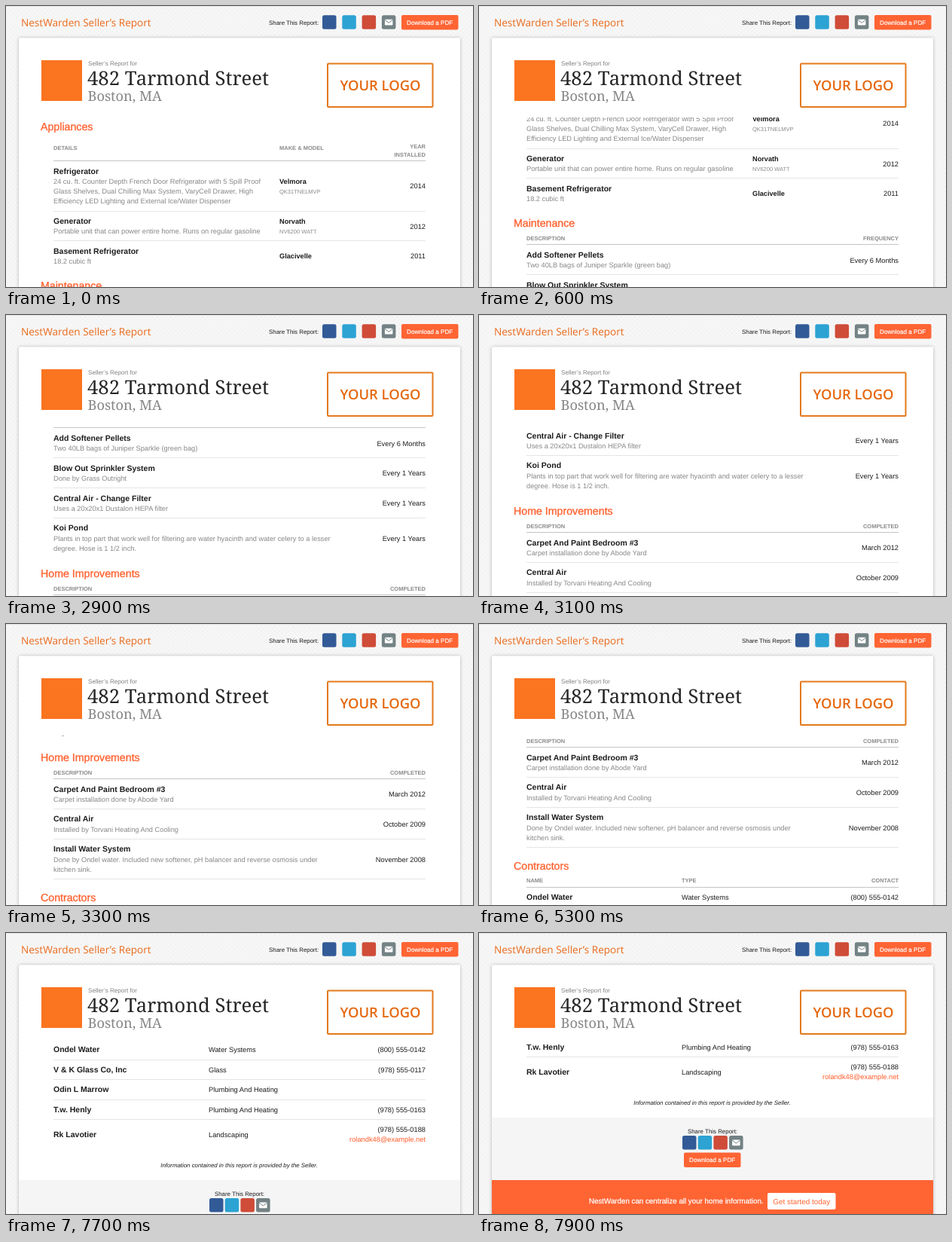
An HTML page that plays this animation: 620 px wide and 373 px high, repeating every 8000 ms.

```html
<!DOCTYPE html>
<html lang="en">
<head>
<meta charset="utf-8">
<title>Seller's Report</title>
<style>
  html, body { margin: 0; width: 100%; height: 100%; overflow: hidden; }
  svg { display: block; width: 100%; height: 100%; }
  text { font-family: "Liberation Sans", Arial, sans-serif; fill: #1c1c1c; text-rendering: geometricPrecision; }
  .brand { font: 13.6px "Open Sans", sans-serif; fill: #ea6a1c; }
  .address { font: 25.7px "Noto Serif", serif; fill: #262626; }
  .city { font: 18.2px "Noto Serif", serif; fill: #858585; }
  .logo { font: 600 18.4px "Open Sans", sans-serif; fill: #e5680f; }
  .eyebrow { font-size: 8.1px; fill: #808080; }
  .share { font-size: 7.9px; }
  .button { font-size: 8.1px; fill: #fff; stroke: #fff; stroke-width: .2; }
  .section { font-size: 14.2px; fill: #ff6230; stroke: #ff6230; stroke-width: .35; }
  .head { font-size: 7.5px; font-weight: bold; fill: #8a8a8a; }
  .name { font-size: 10.5px; font-weight: bold; }
  .detail { font-size: 9.25px; fill: #878787; }
  .value { font-size: 9.3px; }
  .make { font-size: 9.2px; font-weight: bold; }
  .model { font-size: 7.5px; fill: #8a8a8a; }
  .mail { font-size: 9.3px; fill: #ff5a28; }
  .note { font-size: 7.85px; font-style: italic; }
  .pitch { font-size: 9.75px; fill: #fff; stroke: #fff; stroke-width: .25; }
  .start { font-size: 9.9px; fill: #ff6230; }
</style>
</head>
<body>
<svg viewBox="0 0 620 373">
  <defs>
    <pattern id="weave" width="6" height="6" patternUnits="userSpaceOnUse">
      <rect width="6" height="6" fill="#f7f7f7"/>
      <path d="M0 0L6 6M6 0L0 6" stroke="#f2f2f2"/>
    </pattern>
    <filter id="shadow" x="-5%" y="-5%" width="110%" height="110%">
      <feDropShadow dx="0" dy="0" stdDeviation="2" flood-opacity=".28"/>
    </filter>
    <clipPath id="window"><rect y="148" width="620" height="225"/></clipPath>
  </defs>
  <rect width="620" height="373" fill="url(#weave)"/>
  <rect width="620" height="1" fill="#e4e4e4"/>
  <rect x="17" y="42.5" width="586" height="400" rx="2" fill="#fff" filter="url(#shadow)"/>
  <g id="header"></g>
  <g clip-path="url(#window)"><g id="report"></g></g>
</svg>
<script>
const BRAND = "NestWarden", ORANGE = "#ff6433";
const LEFT = 63, MIDDLE = 269, MAKE = 363, RIGHT = 557, LINE = 13.3;
const header = document.getElementById("header");
const report = document.getElementById("report");
let layer = header;

function add(tag, attributes, content = "") {
  const node = document.createElementNS("http://www.w3.org/2000/svg", tag);
  for (const key in attributes) node.setAttribute(key, attributes[key]);
  node.textContent = content;
  layer.append(node);
}
const label = (style, x, y, content, anchor = "start") =>
  add("text", { class: style, x, y, "text-anchor": anchor }, content);
const box = (x, y, width, height, fill, rx = 0) => add("rect", { x, y, width, height, fill, rx });
const rule = (y, fill = "#e5e5e5") => box(LEFT, y - .5, RIGHT - LEFT, 1, fill);

function shareIcons(x, y, pitch) {
  ["#325a96", "#2ca3d3", "#cf4c38", "#738284"].forEach((color, i) =>
    box(x + i * pitch, y, 18.5, 18.5, color, 2.5));
  const left = x + 3 * pitch + 4, top = y + 5.5;
  box(left, top, 10.5, 7.8, "#fff", .8);
  add("path", { d: `M${left} ${top + .6}l5.25 4l5.25 -4`, fill: "none", stroke: "#738284" });
}

function downloadButton(x, y) {
  box(x, y, 75.5, 19.5, ORANGE, 2);
  label("button", x + 37.7, y + 12.6, "Download a PDF", "middle");
}

function section(title, titleY, headY, ruleY, columns) {
  label("section", 46, titleY, title);
  for (const [x, content] of columns)
    label("head", x, headY, content, x === RIGHT ? "end" : "start");
  rule(ruleY, "#c4c4c4");
}

// Each row is [name, detail lines, right value, extra(middle baseline)].
function rows(y, list, lastRule = false) {
  list.forEach(([name, details, value, extra], i) => {
    const height = LINE * details.length, middle = y + height / 2;
    label("name", LEFT, y, name);
    details.forEach((line, n) => label("detail", LEFT, y + LINE * (n + 1), line));
    label("value", RIGHT, middle, value, "end");
    if (extra) extra(middle);
    if (lastRule || i < list.length - 1) rule(Math.round(y + height + 9.2) + .5);
    y += height + 26.5;
  });
}

const product = (maker, model) => y => {
  label("make", MAKE, model ? y - 6.6 : y, maker);
  if (model) label("model", MAKE, y + 6.2, model);
};
const trade = type => y => label("value", MIDDLE, y, type);

label("brand", 20, 27.3, BRAND + " Seller’s Report");
label("share", 349, 25, "Share This Report:");
shareIcons(420, 12.3, 26.3);
downloadButton(525, 12);
box(47, 72, 54, 54, "#fb7420");
label("eyebrow", 109, 79, "Seller’s Report for");
label("address", 108, 105.3, "482 Tarmond Street");
label("city", 108.5, 126, "Boston, MA");
add("rect", { x: 427, y: 76.5, width: 139.5, height: 57.5, rx: 1, fill: "#fff", stroke: "#e37a1c", "stroke-width": 2 });
label("logo", 497, 112, "YOUR LOGO", "middle");

layer = report;

section("Appliances", 165, 190.7, 205.5,
  [[LEFT, "DETAILS"], [MAKE, "MAKE & MODEL"], [RIGHT, "INSTALLED"]].slice(0, 2));
label("head", RIGHT, 188.5, "YEAR", "end");
label("head", RIGHT, 199.5, "INSTALLED", "end");
rows(222.5, [
  ["Refrigerator", [
    "24 cu. ft. Counter Depth French Door Refrigerator with 5 Spill Proof",
    "Glass Shelves, Dual Chilling Max System, VaryCell Drawer, High",
    "Efficiency LED Lighting and External Ice/Water Dispenser"
  ], "2014", product("Velmora", "QK31TNELMVP")],
  ["Generator", ["Portable unit that can power entire home. Runs on regular gasoline"],
    "2012", product("Norvath", "NV6200 WATT")],
  ["Basement Refrigerator", ["18.2 cubic ft"], "2011", product("Glacivelle")]
]);

section("Maintenance", 375.5, 393.7, 399.5, [[LEFT, "DESCRIPTION"], [RIGHT, "FREQUENCY"]]);
rows(416.9, [
  ["Add Softener Pellets", ["Two 40LB bags of Juniper Sparkle (green bag)"], "Every 6 Months"],
  ["Blow Out Sprinkler System", ["Done by Grass Outright"], "Every 1 Years"],
  ["Central Air - Change Filter", ["Uses a 20x20x1 Dustalon HEPA filter"], "Every 1 Years"],
  ["Koi Pond", [
    "Plants in top part that work well for filtering are water hyacinth and water celery to a lesser",
    "degree. Hose is 1 1/2 inch."
  ], "Every 1 Years"]
]);

section("Home Improvements", 597.5, 615.7, 621.5, [[LEFT, "DESCRIPTION"], [RIGHT, "COMPLETED"]]);
rows(638.6, [
  ["Carpet And Paint Bedroom #3", ["Carpet installation done by Abode Yard"], "March 2012"],
  ["Central Air", ["Installed by Torvani Heating And Cooling"], "October 2009"],
  ["Install Water System", [
    "Done by Ondel water. Included new softener, pH balancer and reverse osmosis under",
    "kitchen sink."
  ], "November 2008"]
], true);

section("Contractors", 783.5, 801.3, 807.5, [[LEFT, "NAME"], [MIDDLE, "TYPE"], [RIGHT, "CONTACT"]]);
rows(824.3, [
  ["Ondel Water", [], "(800) 555-0142", trade("Water Systems")],
  ["V & K Glass Co, Inc", [], "(978) 555-0117", trade("Glass")],
  ["Odin L Marrow", [], "", trade("Plumbing And Heating")],
  ["T.w. Henly", [], "(978) 555-0163", trade("Plumbing And Heating")]
], true);
label("name", LEFT, 937.3, "Rk Lavotier");
trade("Landscaping")(936.8);
label("value", RIGHT, 929.5, "(978) 555-0188", "end");
label("mail", RIGHT, 942.8, "rolandk48@example.net", "end");
label("note", 309.5, 977.3, "Information contained in this report is provided by the Seller.", "middle");

box(17, 994, 586, 83, "#f5f5f6");
label("share", 310, 1014.8, "Share This Report:", "middle");
shareIcons(270, 1018, 20.7);
downloadButton(272, 1040.5);
box(17, 1077, 586, 60, ORANGE);
label("pitch", 146, 1107.8, BRAND + " can centralize all your home information.");
box(383, 1094, 90.5, 22, "#fff", 2);
label("start", 428.2, 1108.7, "Get started today", "middle");

// Scrolling happens in bursts of up to five equal jumps, one every 100 ms.
const BURSTS = [500, 2900, 5300, 7700], JUMP = 41.6, LOOP = 8000;

function draw(now) {
  const time = now % LOOP;
  const jumps = BURSTS.reduce((sum, start) =>
    sum + Math.max(0, Math.min(5, Math.floor((time - start) / 100) + 1)), 0);
  report.setAttribute("transform", `translate(0 ${-Math.round(jumps * JUMP)})`);
  requestAnimationFrame(draw);
}
draw(performance.now());
</script>
</body>
</html>
```
